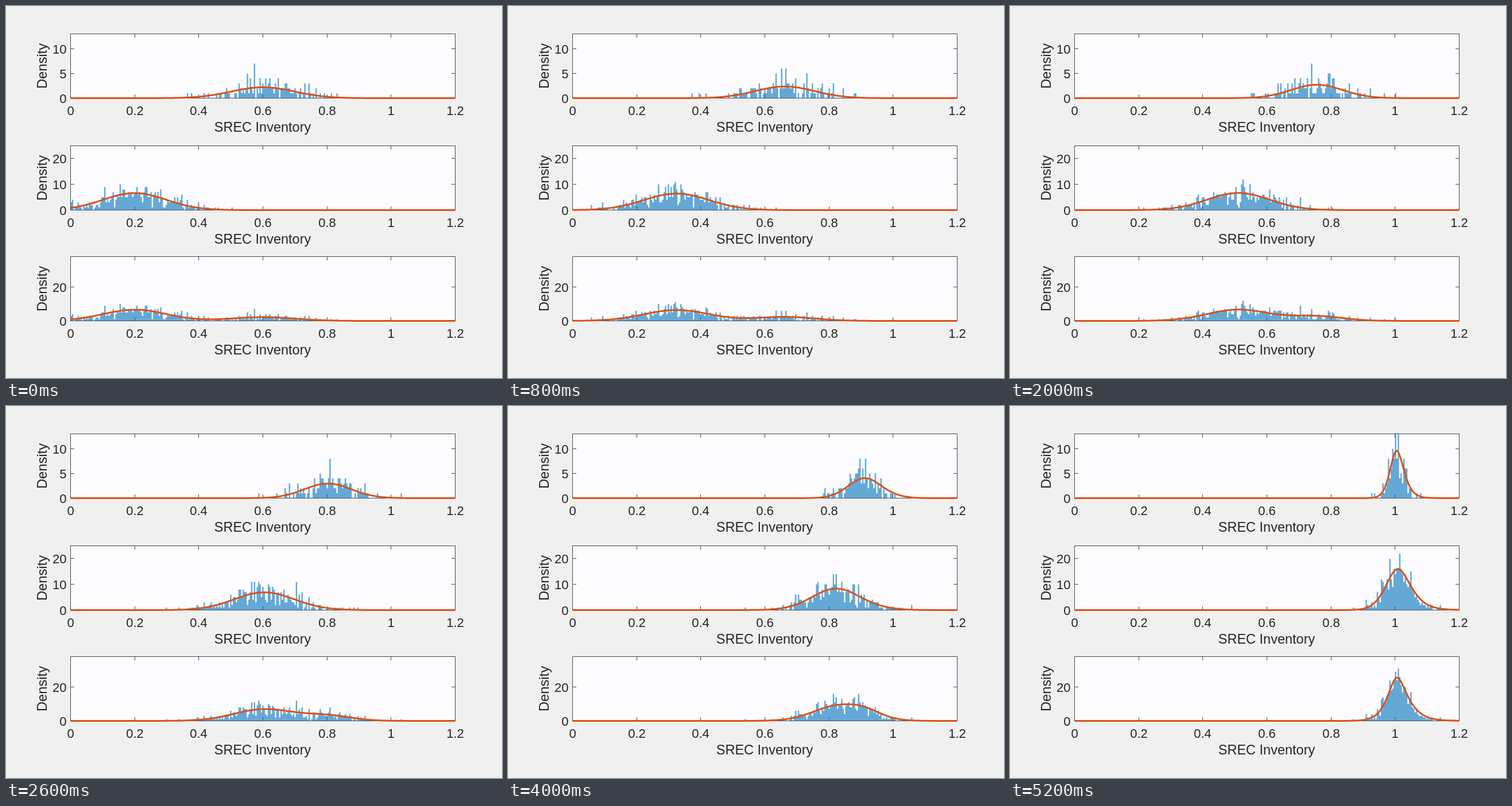
Recreate the animation shown at these times as an HTML page with a canvas. Size 864x648 px, loop 5.3 s.

```html
<!DOCTYPE html>
<html lang="en">
<head>
<meta charset="utf-8">
<title>Inventory density</title>
<style>
  html, body { margin: 0; width: 100%; height: 100%; overflow: hidden; background: #f0f0f0; }
  canvas { display: block; }
</style>
</head>
<body>
<canvas id="stage" width="864" height="648"></canvas>
<script>
const ctx = document.getElementById('stage').getContext('2d');
const FONT = '"Liberation Sans", Arial, sans-serif';
const STEP = 100, STEPS = 53;
const LEFT = 112.5, RIGHT = 782.5, X_MAX = 1.2;
const BINS = 275, BIN = X_MAX / BINS;
const INK = '#262626', FRAME = '#44444e', BLUE = 'rgba(0, 114, 189, 0.6)', ORANGE = '#d95319';

const panels = [
  { top: 48.5, bottom: 160.5, max: 13, ticks: [0, 5, 10] },
  { top: 243.5, bottom: 355.5, max: 25, ticks: [0, 10, 20] },
  { top: 436.5, bottom: 548.5, max: 38, ticks: [0, 20] }
];

// Peak heights at the key times; the variance runs linearly between them.
const keyTimes = [0, 0.8, 2, 2.6, 3.4, 4, 5.2];
const groups = [
  { count: 125, start: 0.6, speed: 0.0779, peaks: [2.2, 2.35, 2.7, 2.95, 3.45, 4.05, 9.6] },
  { count: 375, start: 0.2, speed: 0.1555, peaks: [6.6, 6.4, 6.65, 6.9, 7.5, 8.4, 16] }
];

const toX = v => LEFT + v / X_MAX * (RIGHT - LEFT);
const toY = (p, v) => p.bottom - v / p.max * (p.bottom - p.top);

function random(seed) {
  return () => {
    seed = (seed + 0x6d2b79f5) | 0;
    let r = Math.imul(seed ^ (seed >>> 15), 1 | seed);
    r = (r + Math.imul(r ^ (r >>> 7), 61 | r)) ^ r;
    return ((r ^ (r >>> 14)) >>> 0) / 4294967296;
  };
}

// Bell curve that gains a narrow core and long tails, the right one longer.
function shapeAt(group, t) {
  const area = group.count * BIN / Math.sqrt(2 * Math.PI);
  const variance = i => (area / group.peaks[i]) ** 2;
  let i = 0;
  while (i < keyTimes.length - 2 && t > keyTimes[i + 1]) i++;
  const f = (t - keyTimes[i]) / (keyTimes[i + 1] - keyTimes[i]);
  const spread = Math.sqrt(variance(i) + f * (variance(i + 1) - variance(i)));
  const late = (t / 5.2) ** 4;
  return {
    mean: group.start + group.speed * t,
    sigma: spread / (1 + 0.2 * late),
    peak: area / spread,
    leftTail: 0.07 * late,
    rightTail: 0.13 * late
  };
}

function density(s, x) {
  let u = (x - s.mean) / s.sigma;
  u /= 1 + Math.abs(u) * (u > 0 ? s.rightTail : s.leftTail);
  return s.peak * Math.exp(-u * u / 2);
}

function histogram(s, count, rand) {
  const bins = new Array(BINS).fill(0);
  for (let n = 0; n < count;) {
    const x = s.mean + (rand() - 0.5) * 14 * s.sigma;
    if (rand() * s.peak > density(s, x)) continue;
    n++;
    const k = Math.floor(x / BIN);
    if (k >= 0 && k < BINS) bins[k]++;
  }
  return bins;
}

function label(text, x, y, size, align) {
  ctx.font = `${size}px ${FONT}`;
  ctx.textAlign = align;
  ctx.fillStyle = INK;
  ctx.fillText(text, x, y);
}

function drawData(p, bins, curve) {
  ctx.save();
  ctx.beginPath();
  ctx.rect(LEFT, p.top, RIGHT - LEFT, p.bottom - p.top + 2);
  ctx.clip();

  ctx.beginPath();
  bins.forEach((n, k) => {
    if (n) ctx.rect(toX(k * BIN), toY(p, n), toX(BIN) - LEFT, p.bottom - toY(p, n));
  });
  ctx.fillStyle = BLUE;
  ctx.fill();

  ctx.beginPath();
  for (let k = 0; k <= 400; k++) {
    const x = k / 400 * X_MAX;
    ctx.lineTo(toX(x), toY(p, curve(x)));
  }
  ctx.strokeStyle = ORANGE;
  ctx.lineWidth = 3;
  ctx.lineJoin = 'round';
  ctx.stroke();
  ctx.restore();
}

function drawAxes(p) {
  const line = (x1, y1, x2, y2) => { ctx.moveTo(x1, y1); ctx.lineTo(x2, y2); };
  ctx.beginPath();
  ctx.rect(LEFT, p.top, RIGHT - LEFT, p.bottom - p.top);
  for (let i = 0; i <= 6; i++) {
    const x = Math.round(toX(i * 0.2) - 0.5) + 0.5;
    line(x, p.bottom, x, p.bottom - 6.5);
    line(x, p.top, x, p.top + 6.5);
    label(String(i / 5), x, p.bottom + 29, 22, 'center');
  }
  for (const v of p.ticks) {
    const y = Math.round(toY(p, v) - 0.5) + 0.5;
    line(LEFT, y, LEFT + 6.5, y);
    line(RIGHT, y, RIGHT - 6.5, y);
    label(String(v), 105.5, y + 8, 22, 'right');
  }
  ctx.strokeStyle = FRAME;
  ctx.lineWidth = 1;
  ctx.stroke();

  label('SREC Inventory', 447, p.bottom + 58, 23.5, 'center');
  ctx.save();
  ctx.translate(71, (p.top + p.bottom) / 2);
  ctx.rotate(-Math.PI / 2);
  label('Density', 0, 0, 23.7, 'center');
  ctx.restore();
}

function draw(step) {
  const rand = random(step * 7919 + 17);
  const shapes = groups.map(g => shapeAt(g, step * STEP / 1000));
  const bins = groups.map((g, i) => histogram(shapes[i], g.count, rand));
  const curves = shapes.map(s => x => density(s, x));
  bins.push(bins[0].map((n, k) => n + bins[1][k]));
  curves.push(x => curves[0](x) + curves[1](x));

  ctx.fillStyle = '#f0f0f0';
  ctx.fillRect(0, 0, 864, 648);
  panels.forEach((p, i) => {
    ctx.fillStyle = '#fcfcfe';
    ctx.fillRect(LEFT, p.top, RIGHT - LEFT, p.bottom - p.top);
    drawAxes(p);
    drawData(p, bins[i], curves[i]);
  });
}

let shown = -1;
const began = performance.now();
function tick() {
  const step = Math.floor((performance.now() - began) / STEP) % STEPS;
  if (step !== shown) draw(shown = step);
  requestAnimationFrame(tick);
}
tick();
</script>
</body>
</html>
```
